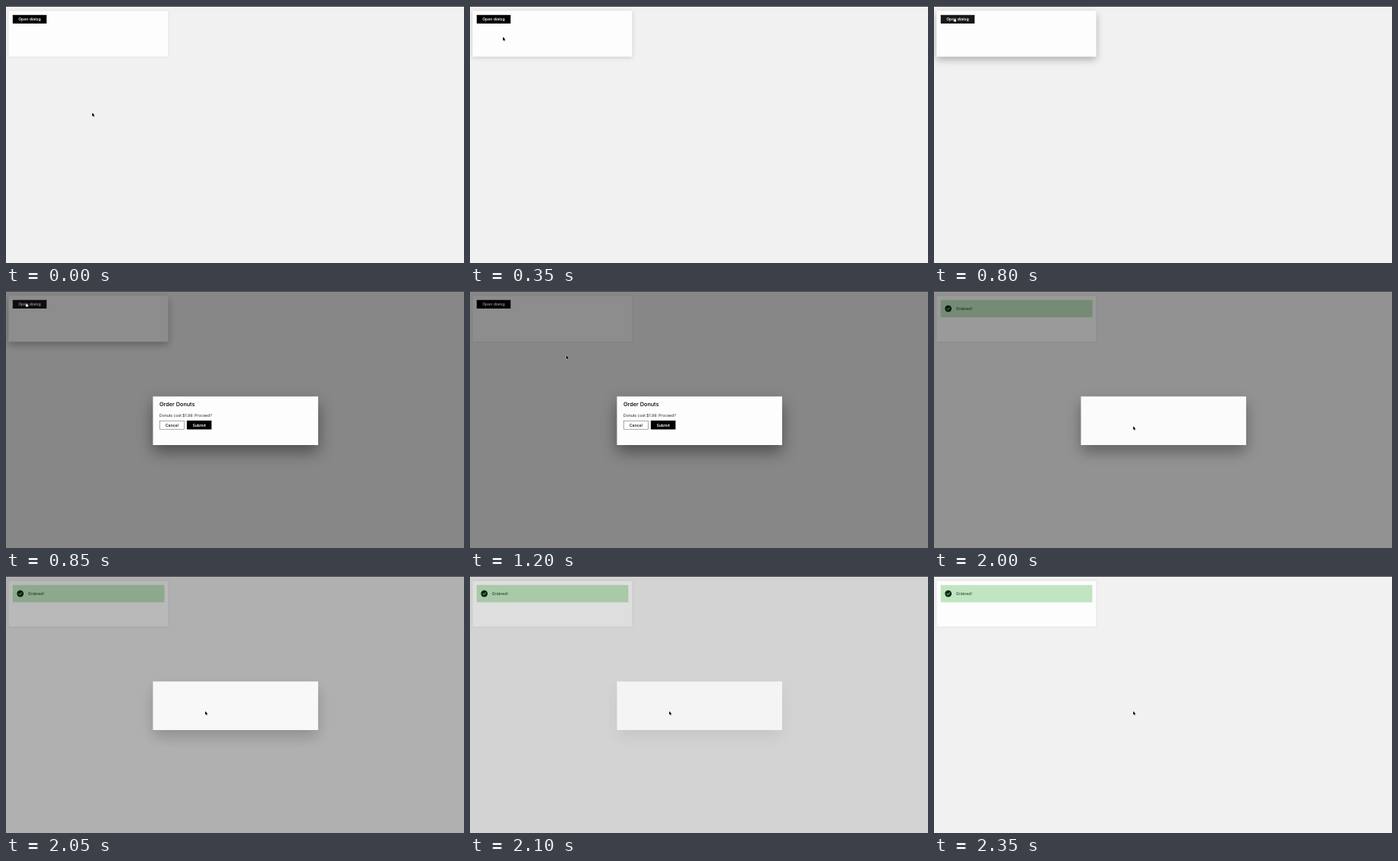
These frames come from a looping animation (600 px wide and 337 px high, 2650 ms). An HTML page:

```html
<!DOCTYPE html>
<html lang="en">
<head>
<meta charset="utf-8">
<title>Order dialog</title>
<style>
  html, body { margin: 0; height: 100%; overflow: hidden; background: #f1f1f1; }
  svg { display: block; width: 100vw; height: 100vh; }
  text { font: 5.1px Inter, sans-serif; fill: #1a1a1a; text-rendering: geometricPrecision; }
  .label { font-weight: 600; text-anchor: middle; }
  .light { fill: #fff; }
  .title { font-size: 7.27px; font-weight: 500; fill: #000; }
  #panel { filter: drop-shadow(0 9px 10px rgba(0, 0, 0, .42)); }
</style>
</head>
<body>
<svg viewBox="0 0 600 337">
  <rect width="600" height="337" fill="#f1f1f1"/>

  <rect id="card" x="3.3" y="6.3" width="209.2" height="60.2" fill="#fdfdfd"/>
  <g id="opener">
    <rect id="openButton" x="8.8" y="11.7" width="44.4" height="11.4" rx=".6"/>
    <text class="label light" x="31" y="19.1">Open dialog</text>
  </g>
  <g id="notice">
    <rect x="8.8" y="11.7" width="198.7" height="22.8" rx="1" fill="#c1e5c0"/>
    <circle cx="18.7" cy="23.1" r="4.4" fill="#0a2b10"/>
    <path d="M16.7 23.2l1.4 1.4 2.7-2.8" fill="none" stroke="#d5f0d4" stroke-width=".9"/>
    <text x="28.7" y="24.9" style="fill:#12351a">Ordered!</text>
  </g>

  <g id="modal">
    <rect y="1" width="600" height="336" opacity=".444"/>
    <rect id="panel" x="192.5" y="138.3" width="216.4" height="63.7" fill="#fdfdfd"/>
    <g id="form">
      <text class="title" x="201" y="151.2">Order Donuts</text>
      <text x="201" y="165">Donuts cost $1.99. Proceed?</text>
      <rect x="201.3" y="170.2" width="32" height="11" fill="#fff" stroke="#555" stroke-width=".5"/>
      <text class="label" x="217.3" y="177.6">Cancel</text>
      <rect id="submitButton" x="236.9" y="169.9" width="32.4" height="11.6"/>
      <text class="label light" x="253.1" y="177.6">Submit</text>
    </g>
  </g>

  <rect width="600" height="1" fill="#444"/>

  <g id="cursor" stroke-linejoin="round">
    <path id="arrow" d="M0 0V4.8L1.1 3.8 1.9 5.6 2.7 5.2 1.9 3.5H3.3Z"
      stroke="#fff" stroke-width=".5" paint-order="stroke"/>
    <path id="hand" d="M.3 .8Q.9 .1 1.3 .9L1.7 2.4Q2.3 2 2.7 2.5 3.2 2.2 3.5 2.8 4.2 2.6 4.3 3.4L4.2 4.8 3.7 6.1H1.7L.1 4.1Q-.4 3.1 .9 3.5Z"
      fill="#fff" stroke="#000" stroke-width=".55"/>
  </g>
</svg>
<script>
const LOOP = 2650, STEP = 50;
const OPENED = 850, SUBMITTED = 1950, FADE = 230;
const el = id => document.getElementById(id);
const clamp = v => Math.min(1, Math.max(0, v));
const progress = (t, from, to) => clamp((t - from) / (to - from));
const ease = u => (1 - Math.cos(Math.PI * u)) / 2;
const mix = (a, b, u) => a + (b - a) * u;
const show = (id, on) => el(id).setAttribute('visibility', on ? 'inherit' : 'hidden');
const gray = v => `rgb(${v},${v},${v})`;
const within = ([x, y], left, top, width, height) =>
  x >= left && x <= left + width && y >= top && y <= top + height;

const START = [113, 140], OPEN = [25, 14.8], SUBMIT = [261, 177.2];

function pointer(t) {
  const [from, to, u] = t < 950
    ? [START, OPEN, progress(t, 0, 500)]
    : [OPEN, SUBMIT, progress(t, 950, 1500)];
  return from.map((v, i) => mix(v, to[i], ease(u)));
}

function shade(hovered, pressed) {
  return gray(pressed ? 42 : hovered ? 24 : 0);
}

function draw(t) {
  const at = pointer(t);
  const open = t >= OPENED;
  const submitted = t >= SUBMITTED;
  const overOpen = t <= 950 && within(at, 8.8, 11.7, 44.4, 11.4);
  const overSubmit = open && !submitted && within(at, 236.9, 169.9, 32.4, 11.6);

  // The card lifts while the pointer is over it.
  const lift = ease(progress(t, 270, 470)) * (1 - ease(progress(t, 950, 1150)));
  el('card').style.filter = `drop-shadow(0 ${mix(.6, 4, lift)}px ${mix(1.2, 5, lift)}px rgba(0,0,0,${mix(.13, .27, lift)}))`;

  el('openButton').setAttribute('fill', shade(overOpen, t === 750));
  el('submitButton').setAttribute('fill', shade(overSubmit, t >= 1650 && t < 1750));

  show('opener', !submitted);
  show('notice', submitted);
  show('form', !submitted);
  el('modal').setAttribute('opacity',
    open ? 1 - ease(progress(t, SUBMITTED, SUBMITTED + FADE)) : 0);

  const hand = overOpen || overSubmit;
  show('hand', hand);
  show('arrow', !hand);
  el('cursor').setAttribute('transform', `translate(${at})`);
}

function frame() {
  const t = performance.now() % LOOP;
  draw(Math.floor(t / STEP) * STEP);
  requestAnimationFrame(frame);
}
frame();
</script>
</body>
</html>
```
